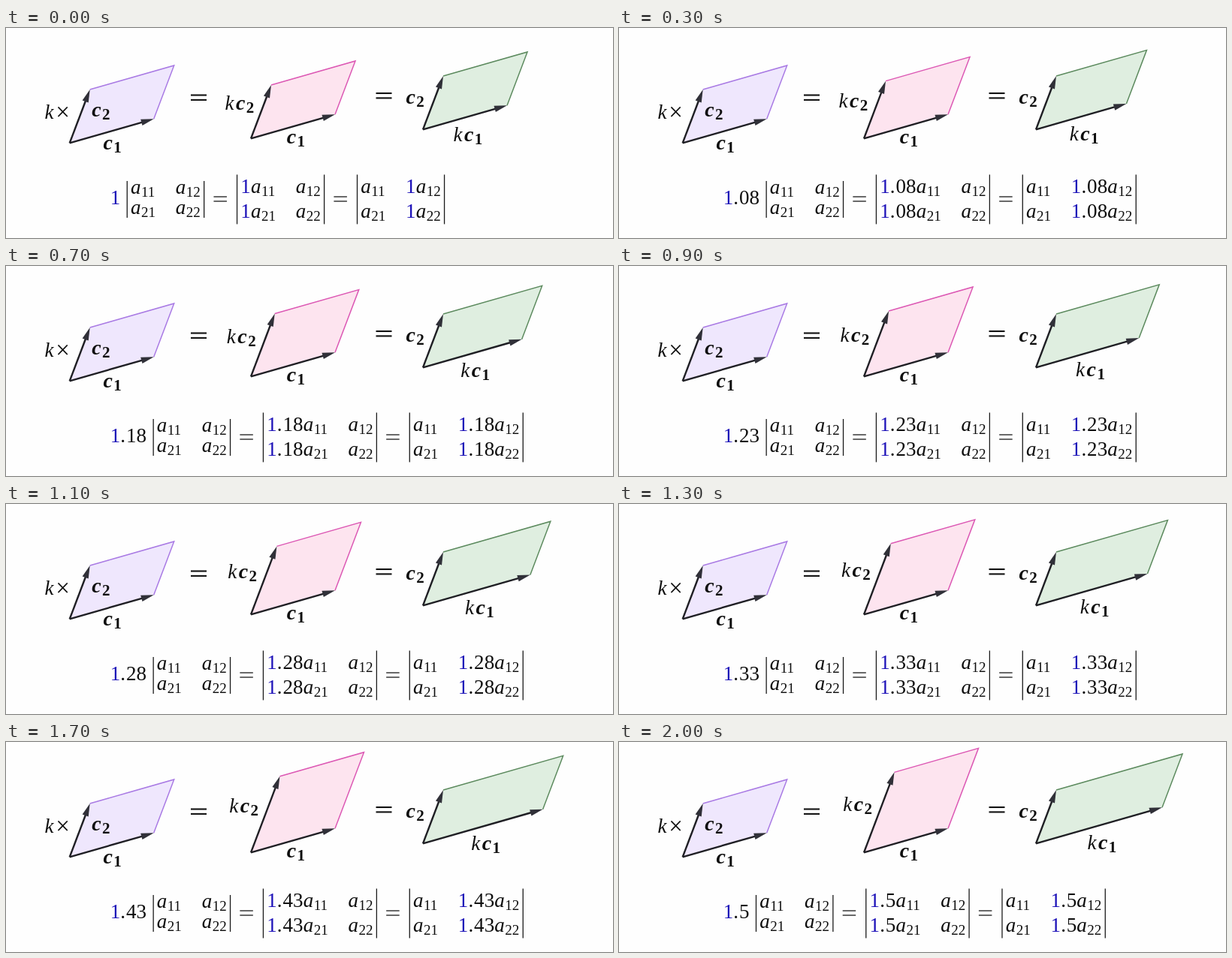
These frames come from a looping animation (808x280 px, 2.1 s). An HTML page:

```html
<!DOCTYPE html>
<html lang="en">
<head>
<meta charset="utf-8">
<title>Scaling a column of a determinant</title>
<style>
  html, body { margin: 0; width: 100%; height: 100%; overflow: hidden; background: #fefefe; }
  svg { display: block; width: 808px; height: 280px; }
  text { font: 27px "Liberation Serif", "Noto Serif", serif; fill: #0e0e0e; }
  .var { font-style: italic; }
  .vec { font-size: 28px; font-style: italic; font-weight: bold; }
  .sub { font-size: 19px; }
  .vecsub { font-size: 21px; font-weight: bold; }
  .times { font-size: 33px; }
  .lead { fill: #1c10b8; }
  .rule { stroke: #1a1a1a; stroke-width: 1.3; }
  .thick { stroke: #111; stroke-width: 2.1; }
  .shaft { stroke: #1f1f24; stroke-width: 2.4; }
  .head { fill: #303038; }
</style>
</head>
<body>
<svg viewBox="0 0 808 280"><g id="fixed"></g><g id="moving"></g></svg>
<script>
const STEP = 100, STEPS = 21, EM = 27.3;
const C1 = [112, -32], C2 = [27, -71.3];

const text = (x, y, s, cls = '') => `<text x="${x}" y="${y}" class="${cls}">${s}</text>`;
const line = (x1, y1, x2, y2, cls = 'rule') =>
  `<line x1="${x1}" y1="${y1}" x2="${x2}" y2="${y2}" class="${cls}"/>`;
const equals = (x, y, w, gap, cls) =>
  line(x, y - gap / 2, x + w, y - gap / 2, cls) + line(x, y + gap / 2, x + w, y + gap / 2, cls);
const scale = (v, k) => [v[0] * k, v[1] * k];

function arrow(x, y, [dx, dy]) {
  const len = Math.hypot(dx, dy), angle = Math.atan2(dy, dx) * 180 / Math.PI;
  return `<g transform="translate(${x} ${y}) rotate(${angle})">` +
    line(0, 0, len - 12, 0, 'shaft') +
    `<path class="head" d="M${len} 0l-17 -4.3v8.6z"/></g>`;
}

function panel(x, y, u, v, fill, stroke) {
  const [ux, uy] = u, [vx, vy] = v;
  const area = `<path d="M${x} ${y}l${ux} ${uy}l${vx} ${vy}l${-ux} ${-uy}z" fill="${fill}"/>`;
  const edge = `<path d="M${x + vx} ${y + vy}l${ux} ${uy}l${-vx} ${-vy}" fill="none" stroke="${stroke}" stroke-width="1.5"/>`;
  return area + edge + arrow(x, y, u) + arrow(x, y, v);
}

const vector = (x, y, i) => text(x, y, 'c', 'vec') + text(x + 13.8, y + 4, i, 'vecsub');
const scaled = (x, y, i) => text(x, y, 'k', 'var') + vector(x + 14.5, y, i);
const entry = (x, y, ij) => text(x, y, 'a', 'var') + text(x + 14, y + 4, ij, 'sub');

const advance = ch => (ch === '.' ? 0.278 : 0.5) * EM;
const widthOf = s => [...s].reduce((w, ch) => w + advance(ch), 0);

function number(x, y, s) {
  let out = '';
  [...s].forEach((ch, i) => {
    out += text(x, y, ch, i ? '' : 'lead');
    x += advance(ch);
  });
  return out;
}

// factorCol: column multiplied by the factor, 0 for none
function determinant(x, factor, factorCol) {
  const w = factorCol ? widthOf(factor) : 0;
  const [top, bottom] = factorCol ? [195.5, 261.5] : [204, 253];
  const rows = factorCol ? [220, 252.5] : [221, 248];
  const right = x + 102.4 + w;
  let out = line(x, top, x, bottom) + line(right, top, right, bottom);
  rows.forEach((y, r) => {
    let cx = x + 4.7;
    for (const col of [1, 2]) {
      if (col === factorCol) {
        out += number(cx, y, factor);
        cx += w;
      }
      out += entry(cx, y, `${r + 1}${col}`);
      cx += 59.8;
    }
  });
  return { out, right };
}

function formula(factor) {
  let out = number(138.7, 235, factor);
  let x = 147.6 + widthOf(factor);
  for (const col of [0, 1, 2]) {
    const det = determinant(x, factor, col);
    out += det.out;
    if (col < 2) out += equals(det.right + 12.8, 228, 17.5, 6, 'rule');
    x = det.right + 43.9;
  }
  return out;
}

function scene(k) {
  const g = k - 1;
  const factor = String(Math.round(k * 100 + 1e-6) / 100);
  return panel(326, 147.3, C1, scale(C2, k), '#fde4ef', '#dc58b4') +
    panel(555, 135.3, scale(C1, k), C2, '#dfeee0', '#5c8a5e') +
    scaled(291.5 + 13.5 * g, 108.5 - 34 * g, 2) +
    scaled(595.5 + 56 * g, 151 - 16 * g, 1) +
    formula(factor);
}

document.getElementById('fixed').innerHTML =
  panel(84.7, 153.3, C1, C2, '#efe7fd', '#a97ae4') +
  text(51.5, 121, 'k', 'var') + text(66.3, 123, '×', 'times') +
  vector(114.3, 118, 2) + vector(129.5, 162, 1) +
  vector(373.8, 154, 1) + vector(532.5, 101, 2) +
  equals(246, 92.7, 21, 6.4, 'thick') + equals(492.5, 90.2, 21, 6.4, 'thick');

const moving = document.getElementById('moving');
const start = performance.now();
let shown = -1;

function render() {
  const step = Math.floor((performance.now() - start) / STEP) % STEPS;
  if (step !== shown) {
    shown = step;
    moving.innerHTML = scene(1 + step * 0.025);
  }
  requestAnimationFrame(render);
}
render();
</script>
</body>
</html>
```
